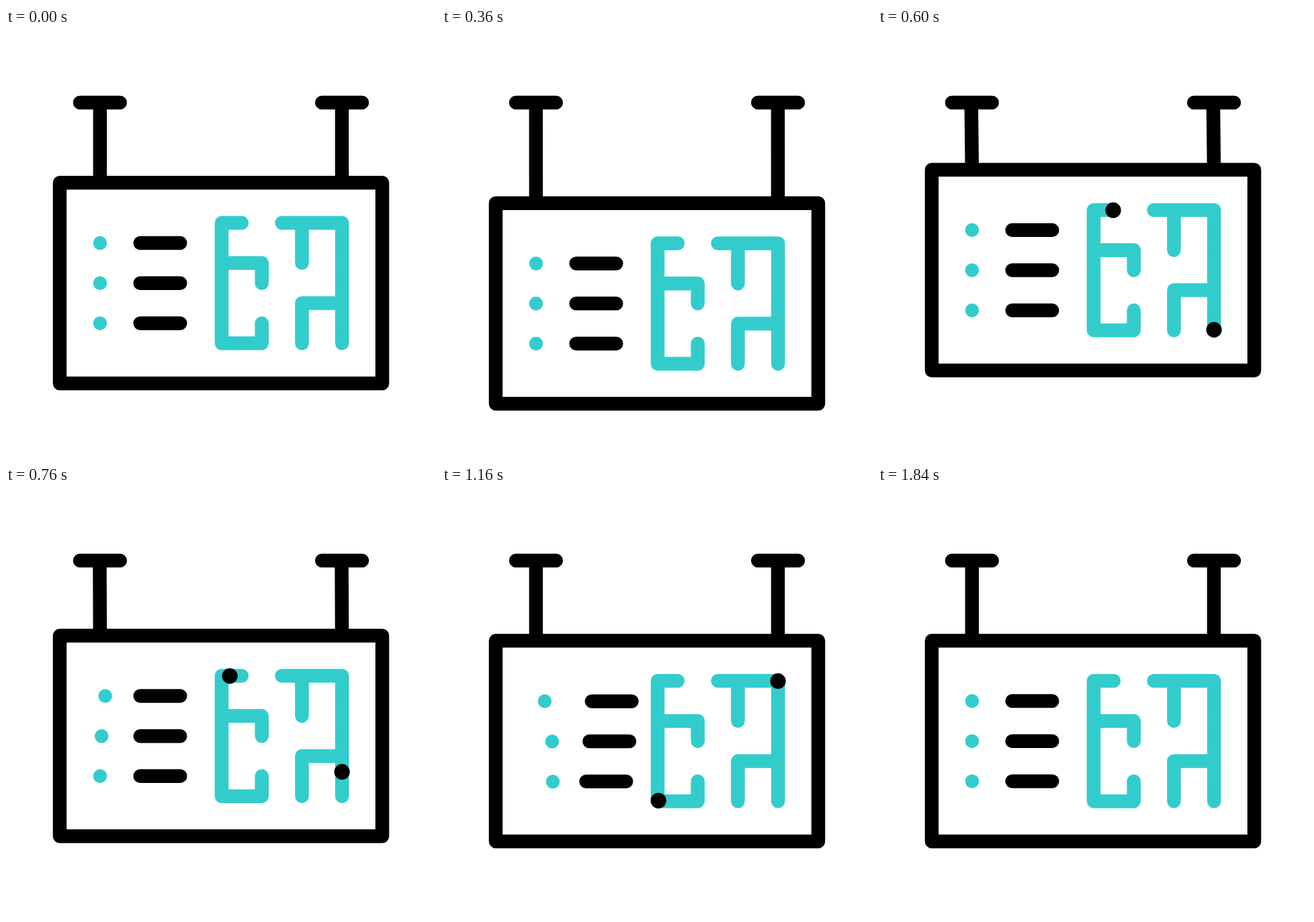
Recreate the animation shown at these times as an HTML page. Size 640 px wide and 640 px high, loop 2000 ms.

```html
<!DOCTYPE html>
<html lang="en">
<head>
<meta charset="utf-8">
<title>Hanging sign</title>
<style>
  html, body { margin: 0; width: 100%; height: 100%; overflow: hidden; background: #fff; }
  svg { display: block; width: 100vw; height: 100vh; }
  .line { fill: none; stroke: #000; stroke-width: 20.5; stroke-linecap: round; stroke-linejoin: round; }
  .rod { stroke-linecap: butt; }
  .glyphs { stroke: #3cc; stroke-width: .688; }
  .bullet { fill: #3cc; }
</style>
</head>
<body>
<svg viewBox="0 0 640 640">
  <path class="line" d="M110 111H169.8M470.2 111H530"/>
  <path class="line rod" id="rods"/>
  <g id="board">
    <rect class="line" x="80" y="230.3" width="480" height="298.6"/>
    <path class="line glyphs" transform="translate(321 290.1) scale(29.86)"
      d="M1 0H0V6H2V5M0 2H2V3 M3 0H6V6M4 0V2M4 6V4H6"/>
    <g id="parts"></g>
  </g>
</svg>
<script>
const STEP = 40, STEPS = 50;
const board = document.getElementById('board');
const rods = document.getElementById('rods');
const parts = document.getElementById('parts');

const ease = p => p * p * (3 - 2 * p);
const mix = (a, b, p) => a + (b - a) * p;

// Eased walk through stops {at, steps}, where steps is the time to reach a stop.
function walk(stops, time) {
  let from = stops[0].at;
  for (const { at, steps } of stops.slice(1)) {
    if (time < steps) {
      const p = ease(Math.max(0, time) / steps);
      return from.map((v, i) => mix(v, at[i], p));
    }
    time -= steps;
    from = at;
  }
  return from;
}

// Out to one side, over to the other, then back to rest; each leg lasts `change` steps longer.
function swing(time, out, back, steps, change = 0) {
  const stops = [0, out, back, 0].map((v, i) => ({ at: [v], steps: steps + (i - 1) * change }));
  return walk(stops, time)[0];
}

function add(tag, attrs) {
  const el = document.createElementNS('http://www.w3.org/2000/svg', tag);
  for (const key in attrs) el.setAttribute(key, attrs[key]);
  return parts.appendChild(el);
}

const place = (el, x, y) => el.setAttribute('transform', `translate(${x} ${y})`);

const rows = [0, 1, 2].map(i => {
  const y = 320 + 59.7 * i;
  return {
    bullet: add('circle', { class: 'bullet', cx: 140, cy: y, r: 10.25 }),
    bar: add('path', { class: 'line', d: `M199.7 ${y}h59.6` })
  };
});

// Runners follow the glyph strokes in grid units, one leg per LEG steps.
const LEG = 7, RUN_START = 15, RUN_STEPS = 4 * LEG;
const stop = (x, y, legs = 1) => ({ at: [x, y], steps: legs * LEG });
const runners = [
  [stop(.94, 0), stop(0, 0), stop(0, 6), stop(2, 6), stop(2, 5)],
  [stop(6, 6), stop(6, 0, 2), stop(4, 0), stop(4, 2)]
].map(route => ({ route, el: add('circle', { r: 11.6 }) }));

function draw(step) {
  const drop = step < 8 ? swing(step - 3, 33.3, 0, 5) : mix(0, 1, swing(step - 1, 33.3, -19.2, LEG));
  const lean = swing(step - 8, -1.1, 0, LEG);
  place(board, 0, drop);
  rods.setAttribute('d', [139.9, 500].map(x => `M${x + lean} 111L${x} ${230 + drop}`).join(''));

  rows.forEach(({ bullet, bar }, i) => {
    const roll = swing(step - 15 - 2 * i, 25.6, -23.5, 11, -2);
    const slide = swing(step - 23 - i, 24.5, -23.5, LEG);
    place(bullet, roll, Math.abs(roll) / 50);
    place(bar, slide, Math.abs(slide) / 50);
  });

  const time = step - RUN_START;
  for (const { route, el } of runners) {
    const [x, y] = walk(route, time);
    el.style.display = time >= 0 && time <= RUN_STEPS ? '' : 'none';
    place(el, 322.2 + 29.65 * x, 290.4 + 29.65 * y);
  }
}

const start = performance.now();
function tick(now) {
  const elapsed = Math.max(0, now - start);
  draw(Math.floor(elapsed / STEP + 0.2) % STEPS);
  requestAnimationFrame(tick);
}
draw(0);
requestAnimationFrame(tick);
</script>
</body>
</html>
```
